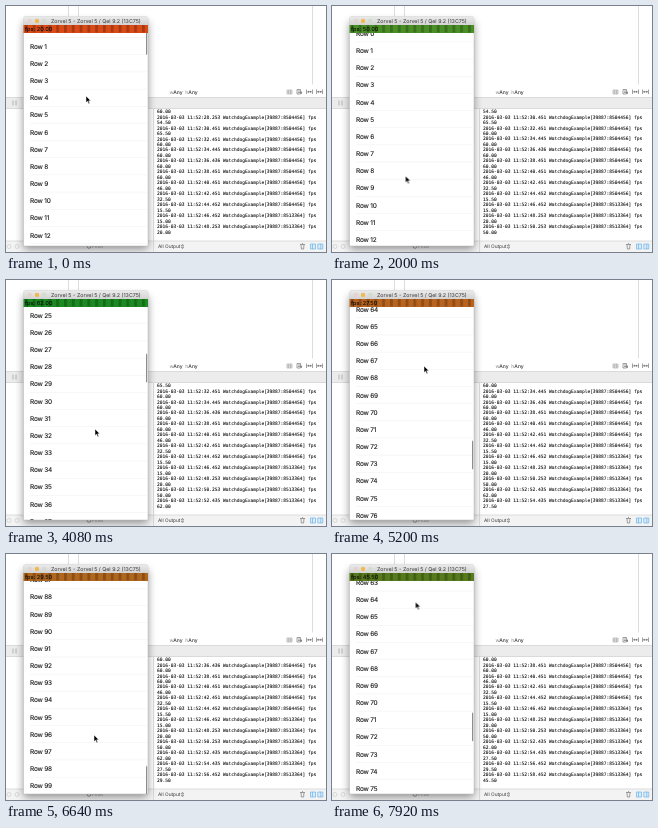
An HTML page that plays this animation: 320x246 px, repeating every 8000 ms.

```html
<!DOCTYPE html>
<html lang="en">
<head>
<meta charset="utf-8">
<title>Frame rate monitor</title>
<style>
@property --s { syntax: '<number>'; inherits: true; initial-value: 0; }
html, body { margin: 0; width: 100%; height: 100%; overflow: hidden; background: #fff; }
svg { display: block; width: 100vw; height: 100vh; }
text { font-family: Inter, Roboto, sans-serif; text-rendering: geometricPrecision; white-space: pre; }
#log text { font: 4.57px "DejaVu Sans Mono", monospace; fill: #111; stroke: #111; stroke-width: .08; }
#rows text { font-size: 6.5px; letter-spacing: -.2px; fill: #0a0a0a; stroke: #0a0a0a; stroke-width: .08; }
#bar text { font-size: 5.6px; font-weight: 500; fill: #0a0a0a; }
.ui { font-size: 5px; fill: #333; }
.line { stroke: #cfcfcf; stroke-width: .7; fill: none; }
.icon { stroke: #777; stroke-width: .7; fill: none; }
.faint { stroke: #ccc; }

/* 1% = 80 ms */
#table { animation: scroll 8s infinite; }
#rows { transform: translateY(calc(var(--s) * -1px)); }
#thumb { transform: translateY(calc(var(--s) * .1288px)); animation: thumb 8s linear infinite; }
#log { animation: log 8s step-end infinite; }
#bar { animation: bar 8s step-end infinite; }
#cursor { animation: cursor 8s ease-in-out infinite; }

@keyframes scroll {
  0% { --s: 4.3; animation-timing-function: ease-out; }
  6%, 27.5% { --s: 0; animation-timing-function: ease-in-out; }
  36% { --s: 89; animation-timing-function: ease-out; }
  41% { --s: 100; animation-timing-function: ease-out; }
  51% { --s: 420; animation-timing-function: ease-out; }
  57.5% { --s: 760; animation-timing-function: ease-out; }
  65% { --s: 1095.5; animation-timing-function: ease-out; }
  75%, 84% { --s: 1494.5; animation-timing-function: ease-out; }
  91% { --s: 1300; animation-timing-function: ease-out; }
  99%, 100% { --s: 1080; }
}
@keyframes thumb {
  0%, 12% { opacity: 1; }
  15%, 27% { opacity: 0; }
  28.5%, 100% { opacity: 1; }
}
@keyframes log {
  0% { transform: none; }
  13.7% { transform: translateY(-10.96px); }
  36.5% { transform: translateY(-21.92px); }
  55.5% { transform: translateY(-32.88px); }
  75.7% { transform: translateY(-43.84px); }
  95.7%, 100% { transform: translateY(-54.8px); }
}
@keyframes bar {
  0% { transform: none; }
  13.7% { transform: translateY(-10px); }
  35.5% { transform: translateY(-20px); }
  55.5% { transform: translateY(-30px); }
  75.7% { transform: translateY(-40px); }
  95.7%, 100% { transform: translateY(-50px); }
}
@keyframes cursor {
  0% { transform: translate(80px, 90px); }
  22%, 27.5% { transform: translate(73.5px, 170px); }
  32% { transform: translate(78px, 110px); }
  36% { transform: translate(79.5px, 139px); }
  41% { transform: translate(84px, 165px); }
  44% { transform: translate(88px, 95px); }
  51% { transform: translate(89px, 149px); }
  54.5% { transform: translate(91px, 85px); }
  57.5% { transform: translate(90px, 160px); }
  61%, 65% { transform: translate(92px, 86px); }
  68% { transform: translate(91px, 160px); }
  71% { transform: translate(92px, 90px); }
  80%, 83% { transform: translate(88px, 181px); }
  85% { transform: translate(86px, 70px); }
  88% { transform: translate(85px, 140px); }
  92% { transform: translate(84px, 48px); }
  95% { transform: translate(84px, 115px); }
  99%, 100% { transform: translate(83.5px, 48px); }
}
</style>
</head>
<body>
<svg viewBox="0 0 320 246" preserveAspectRatio="none">
  <defs>
    <clipPath id="logClip"><rect x="149" y="103" width="171" height="125.8"/></clipPath>
    <clipPath id="barClip"><rect x="17.5" y="19" width="124.5" height="7.5"/></clipPath>
    <clipPath id="tableClip"><rect x="17.5" y="19" width="124.5" height="221"/></clipPath>
    <linearGradient id="title" x2="0" y2="1">
      <stop stop-color="#ebebeb"/><stop offset="1" stop-color="#d3d3d3"/>
    </linearGradient>
    <pattern id="stripes" width="7.8" height="8" x="19" patternUnits="userSpaceOnUse">
      <rect width="2.8" height="8" opacity=".22"/>
    </pattern>
    <filter id="blur" x="-20%" y="-20%" width="140%" height="140%"><feGaussianBlur stdDeviation="4.5"/></filter>
  </defs>

  <!-- editor behind -->
  <rect width="320" height="246" fill="#fff"/>
  <path class="line" d="M62.5 0V12M72.5 0V12M306.5 0V78.5"/>
  <text class="ui" x="163.5" y="88" font-weight="500"><tspan fill="#999">w</tspan>Any  <tspan fill="#999">h</tspan>Any</text>
  <path class="icon" stroke-opacity=".6" d="M281 84h5v4h-5zM282.7 84v4M284.4 84v4M281 86h5"/>
  <path class="icon" d="M291 83.5h3.500v4.500H291zM292 85h2M292 86.500h4M295.500 85.500v2.500"/>
  <path class="icon" d="M300.500 83.500v4.500M306.500 83.500v4.500M301 85.800h5M310.500 83.500v4.500M316.500 83.500v4.500M311 85.800h5"/>
  <path fill="#777" d="M302 84.500v2.600l1.300-1.300zM305 84.500v2.600l-1.300-1.300zM312.800 84.500v2.600l-1.500-1.300zM314.200 84.500v2.600l1.500-1.300z"/>
  <rect y="91.5" width="320" height="11" fill="#ececec"/>
  <path class="line" d="M0 91.5H320M0 102.5H320"/>
  <path class="icon" d="M7 94.5v5M10 94.5v5" stroke-opacity=".7"/>
  <path class="line" d="M147.5 103V246"/>
  <g clip-path="url(#logClip)"><g id="log"></g></g>
  <rect y="235" width="320" height="11" fill="#f3f3f3"/>
  <path class="line" d="M0 235H320M147.5 235V246"/>
  <g class="icon faint">
    <circle cx="3" cy="240.5" r="2"/><circle cx="11" cy="240.5" r="2"/>
  </g>
  <g class="icon">
    <circle cx="83" cy="240.5" r="1.8"/>
    <path d="M294 238.500h5M295 238.500l.4 4.500h2.200l.4-4.500M296 237.500h1"/>
    <path d="M175.300 239.800l1.200-1.500 1.200 1.500zM175.300 241.200l1.200 1.500 1.200-1.500z"/>
  </g>
  <text class="ui" x="86" y="242.3" style="fill:#999">Filter</text>
  <text class="ui" x="152" y="242.3" style="font-size:4.8px">All Output</text>
  <path fill="#d9ecfb" stroke="#6bb2e6" stroke-width=".7" d="M304.500 238h5v5h-5zM311.800 238h5v5h-5zM306.500 238v5M314.800 238v5"/>

  <!-- device window -->
  <rect x="17.5" y="16" width="124.5" height="227" rx="2" opacity=".42" filter="url(#blur)"/>
  <path d="M17.500 240V13q0-2.500 2.500-2.500H139.500q2.500 0 2.500 2.500V240z" fill="#fff" stroke="#b5b5b5" stroke-width=".5"/>
  <path d="M17.500 19V13q0-2.500 2.500-2.500H139.500q2.500 0 2.500 2.500V19z" fill="url(#title)"/>
  <circle cx="23.8" cy="15" r="2.2" fill="#e3d3cf"/>
  <circle cx="31" cy="15" r="2.2" fill="#f2b950"/>
  <circle cx="38.2" cy="15" r="2.2" fill="#d3dbd0"/>
  <text x="45" y="16.9" font-size="5.3" fill="#333">Zorvel 5 - Zorvel 5 / Qel 9.2 (13C75)</text>
  <g id="table" clip-path="url(#tableClip)">
    <g id="rows"></g>
    <rect id="thumb" x="140" y="19.5" width="1.2" height="28.5" rx=".6" fill="#8c8c8c"/>
  </g>
  <g clip-path="url(#barClip)">
    <g id="bar"></g>
    <rect x="17.5" y="19" width="124.5" height="7.5" fill="url(#stripes)"/>
  </g>

  <path id="cursor" d="M0 0V6.600L1.600 5.200 2.700 7.700 3.800 7.200 2.700 4.800H4.800z" fill="#000" stroke="#fff" stroke-width=".5"/>
</svg>
<script>
const add = (parent, tag, attrs, text = '') => {
  const el = document.createElementNS('http://www.w3.org/2000/svg', tag);
  for (const key in attrs) el.setAttribute(key, attrs[key]);
  el.textContent = text;
  parent.append(el);
};
const byId = id => document.getElementById(id);

const PITCH = 17.16;
for (let i = 0; i < 100; i++) {
  const top = 19 + i * PITCH;
  add(byId('rows'), 'text', { x: 24, y: top + 10.9 }, 'Row ' + i);
  add(byId('rows'), 'rect', { x: 24, y: top + PITCH - .5, width: 118, height: .5, fill: '#eee' });
}

const samples = [
  ['28.253', '54.50'], ['30.451', '65.50'], ['32.451', '60.00'], ['34.445', '60.00'],
  ['36.436', '60.00'], ['38.451', '60.00'], ['40.451', '46.00'], ['42.451', '32.50'],
  ['44.452', '15.50'], ['46.452', '15.00'], ['48.253', '20.00'], ['50.253', '50.00'],
  ['52.435', '62.00'], ['54.435', '27.50'], ['56.452', '29.50'], ['58.452', '45.50']
];
const lines = ['60.00'];
for (const [sec, fps] of samples) {
  const thread = sec > '46' ? 8513364 : 8504456;
  lines.push(`2016-03-03 11:52:${sec} WatchdogExample[39887:${thread}] fps`, fps);
}
lines.forEach((line, i) => add(byId('log'), 'text', { x: 151, y: 107.1 + i * 5.48 }, line));

const colors = ['#d94a16', '#4a8f26', '#1c8a22', '#b8641f', '#b0661d', '#567a1c'];
colors.forEach((fill, i) => {
  const y = 19 + i * 10;
  add(byId('bar'), 'rect', { x: 17.5, y, width: 124.5, height: 10, fill });
  add(byId('bar'), 'text', { x: 19, y: y + 5.9 }, 'fps: ' + samples[i + 10][1]);
});
</script>
</body>
</html>
```
